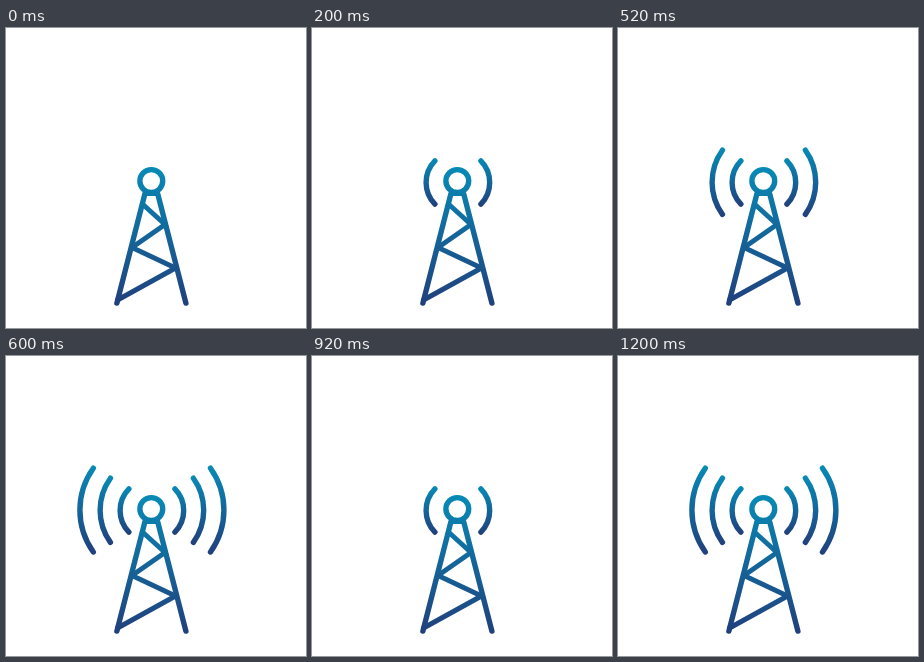
Write an HTML page with a canvas that moves like this. It is 300 by 300 pixels and loops after 1.4 s.

```html
<!DOCTYPE html>
<html lang="en">
<head>
<meta charset="utf-8">
<title>Radio tower</title>
<style>
  html, body { margin: 0; width: 100%; height: 100%; overflow: hidden; background: #fff; }
  canvas { display: block; width: 300px; height: 300px; }
</style>
</head>
<body>
<canvas id="stage" width="300" height="300"></canvas>
<script>
const ctx = document.getElementById('stage').getContext('2d');
const STEP = 200;
const WAVES = [0, 1, 2, 3, 1, 2, 3]; // visible wave pairs per step
const MID_X = 145.9;

// Each wave: end point x, outermost x, top and bottom of the stroke's centre line
const arcs = [
  { end: 122.9, edge: 114.1, top: 132.9, bottom: 176.1 },
  { end: 104.4, edge: 94.1, top: 122.2, bottom: 186.4 },
  { end: 87.3, edge: 73.9, top: 112.2, bottom: 196 }
];

function fade(top, bottom) {
  const g = ctx.createLinearGradient(0, top, 0, bottom);
  g.addColorStop(0, '#078bb6');
  g.addColorStop(1, '#213f7c');
  return g;
}

function line(...points) {
  ctx.beginPath();
  points.forEach(([x, y]) => ctx.lineTo(x, y));
  ctx.stroke();
}

function drawTower() {
  ctx.strokeStyle = fade(138, 278);
  ctx.lineWidth = 5.4;
  ctx.beginPath();
  ctx.arc(145.3, 153, 11.4, 0, Math.PI * 2);
  ctx.stroke();
  line([110.9, 275.1], [139, 165.4], [151.6, 165.4], [179.9, 275.1]);
  ctx.lineWidth = 5;
  line([137, 176.5], [159, 196.5], [126, 219.5], [169.5, 240], [111.5, 272]);
}

function drawArc({ end, edge, top, bottom }) {
  const half = (bottom - top) / 2;
  const sag = end - edge;
  const r = (half * half + sag * sag) / (2 * sag);
  const spread = Math.asin(half / r);
  const y = (top + bottom) / 2;
  const cx = edge + r;
  ctx.strokeStyle = fade(top - 3, bottom + 3);
  ctx.lineWidth = 5.4;
  ctx.beginPath();
  ctx.arc(cx, y, r, Math.PI - spread, Math.PI + spread);
  ctx.stroke();
  ctx.beginPath();
  ctx.arc(2 * MID_X - cx, y, r, -spread, spread);
  ctx.stroke();
}

function draw(time) {
  const step = Math.floor(time / STEP) % WAVES.length;
  ctx.fillStyle = '#fff';
  ctx.fillRect(0, 0, 300, 300);
  ctx.lineCap = ctx.lineJoin = 'round';
  drawTower();
  arcs.slice(0, WAVES[step]).forEach(drawArc);
}

const start = performance.now();
function tick() {
  draw(performance.now() - start);
  requestAnimationFrame(tick);
}
tick();
</script>
</body>
</html>
```
